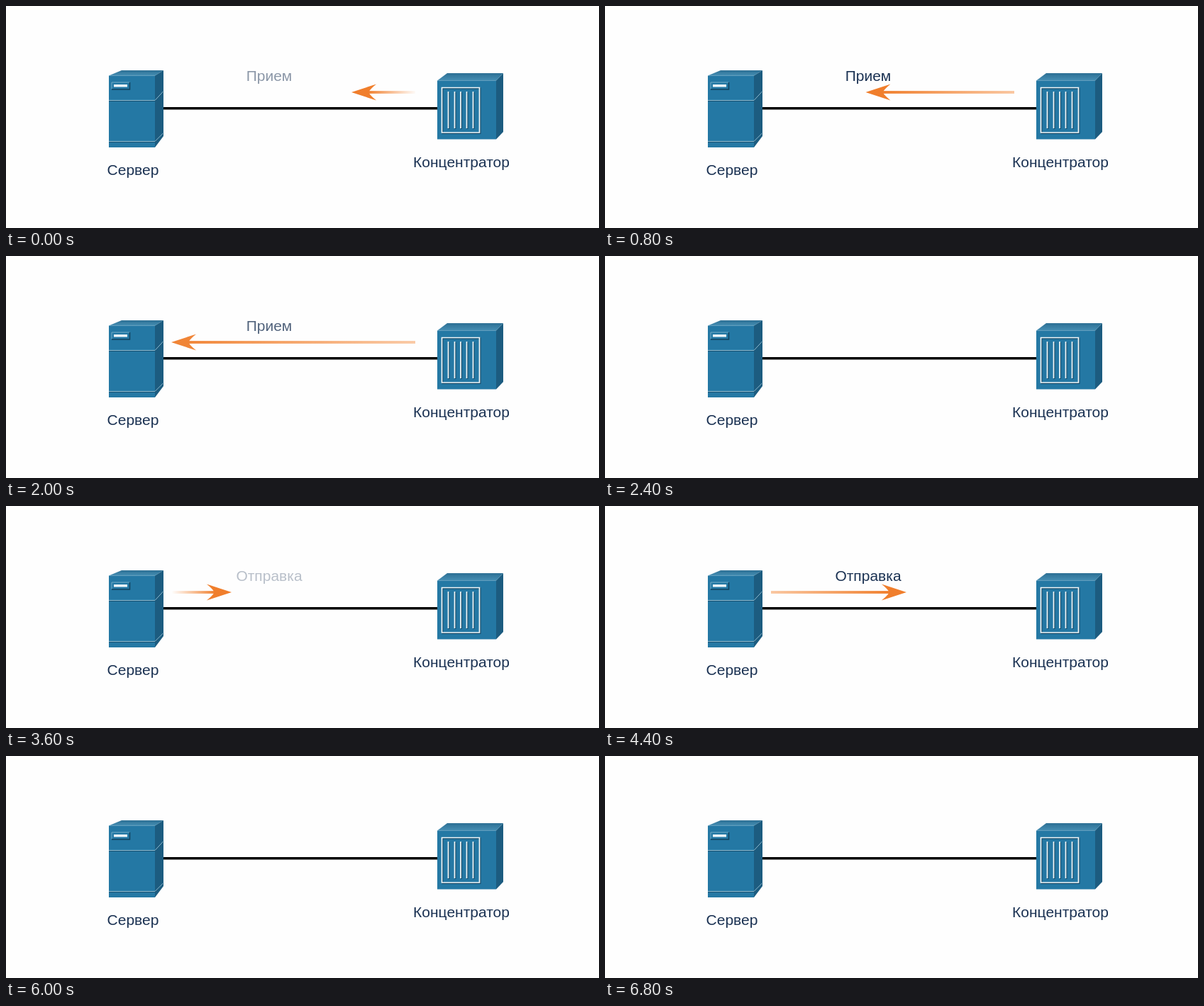
Recreate the animation shown at these times as an HTML page. Size 836 by 314 pixels, loop 7 s.

```html
<!DOCTYPE html>
<html lang="ru">
<head>
<meta charset="utf-8">
<style>
  html, body { margin: 0; width: 100%; height: 100%; overflow: hidden; background: #fefefe; }
  svg { display: block; }
  text { font: 21px "Liberation Sans", Arial, sans-serif; fill: #1b3253; text-anchor: middle; }
</style>
</head>
<body>
<svg width="836" height="314" viewBox="0 0 836 314">
  <defs>
    <linearGradient id="top" x1="0" y1="0" x2="0" y2="1">
      <stop stop-color="#2c6f94"/><stop offset="1" stop-color="#468fb4"/>
    </linearGradient>
    <linearGradient id="shaft">
      <stop class="tail" stop-color="#f4822d"/><stop offset="1" stop-color="#f07e2c"/>
    </linearGradient>
  </defs>

  <path d="M221 144.7H609" stroke="#000" stroke-width="3.6"/>

  <g id="server">
    <path d="M145 98.500L163 91H222L210 98.500Z" fill="url(#top)"/>
    <path d="M210 98.500L222 91V184L210 200Z" fill="#1c5c80"/>
    <path d="M145 98.500H210V200H145Z" fill="#2478a4"/>
    <g fill="none">
      <path d="M145 134.500H210L222 121.500M145 192.500H210L222 180.500" stroke="#17506f"/>
      <path d="M145 133.500H210L222 120.500M145 191.500H210L222 179.500" stroke="#8fbfd6"/>
      <path d="M149 117.500V108H174" stroke="#75abc6"/>
      <path d="M149 118H174.500V108" stroke="#12425e" stroke-width="1.500"/>
    </g>
    <path d="M152 111H171V114.500H152Z" fill="#f4fafc"/>
  </g>

  <g id="hub">
    <path d="M608 105.500L622 95H701L691 105.500Z" fill="url(#top)"/>
    <path d="M691 105.500L701 95V178L691 188.500Z" fill="#1c5c80"/>
    <path d="M608 105.500H691V188.500H608Z" fill="#2478a4"/>
    <g fill="none" stroke-width="2">
      <path id="slots" d="M615.500 116.500H668.500V180H615.500ZM624.500 122V174M633.500 122V174M642 122V174M650.500 122V174M659.500 122V174" stroke="#164b69"/>
      <path d="M614.500 115.500H667.500V179H614.500ZM623.500 121V173M632.500 121V173M641 121V173M649.500 121V173M658.500 121V173" stroke="#f2f8fa" stroke-width="1.700"/>
    </g>
  </g>

  <text x="179" y="239">Сервер</text>
  <text x="642" y="228">Концентратор</text>
  <text id="receiveLabel" x="371" y="106">Прием</text>
  <text id="sendLabel" x="371" y="106">Отправка</text>

  <g id="arrow">
    <rect id="bar" y="-1.900" height="3.800" fill="url(#shaft)"/>
    <path id="head" d="M0 0L-35 -11.500Q-27 -5 -24 0Q-27 5 -35 11.500Z" fill="#f07e2c"/>
  </g>
</svg>
<script>
  const LOOP = 7000, STEP = 200, GROW = 1000;
  const $ = id => document.getElementById(id);
  const tail = document.querySelector('.tail');
  const clamp = v => Math.max(0, Math.min(1, v));
  const ease = p => p < .5 ? 4 * p ** 3 : 1 - 4 * (1 - p) ** 3;

  const phases = [
    { label: $('receiveLabel'), place: 'translate(577 122) scale(-1 1)',
      show: -190, fadeIn: 380, grow: 310, hide: 1890, fadeOut: 450, from: 90, to: 344 },
    { label: $('sendLabel'), place: 'translate(234 122)',
      show: 3480, fadeIn: 400, grow: 3935, hide: 5200, fadeOut: 390, from: 84, to: 350 },
  ];

  function drawArrow(phase, t, opacity) {
    const length = phase.from + (phase.to - phase.from) * ease(clamp((t - phase.grow) / GROW));
    $('arrow').setAttribute('transform', phase.place);
    $('arrow').setAttribute('opacity', opacity);
    $('bar').setAttribute('width', length - 23);
    $('head').setAttribute('transform', `translate(${length} 0)`);
    tail.setAttribute('stop-opacity', Math.min(.45, (length - 82) / 240));
  }

  function draw(now) {
    const t = Math.floor(now % LOOP / STEP) * STEP;
    $('arrow').setAttribute('opacity', 0);
    for (const phase of phases) {
      const shown = clamp((t - phase.show) / phase.fadeIn);
      const left = 1 - clamp((t - phase.hide) / phase.fadeOut);
      phase.label.setAttribute('opacity', shown * left);
      if (shown * left > 0) drawArrow(phase, t, Math.min(1, left * 1.25));
    }
    requestAnimationFrame(draw);
  }

  const start = performance.now();
  const tick = draw;
  requestAnimationFrame(() => tick(performance.now() - start));
</script>
</body>
</html>
```
